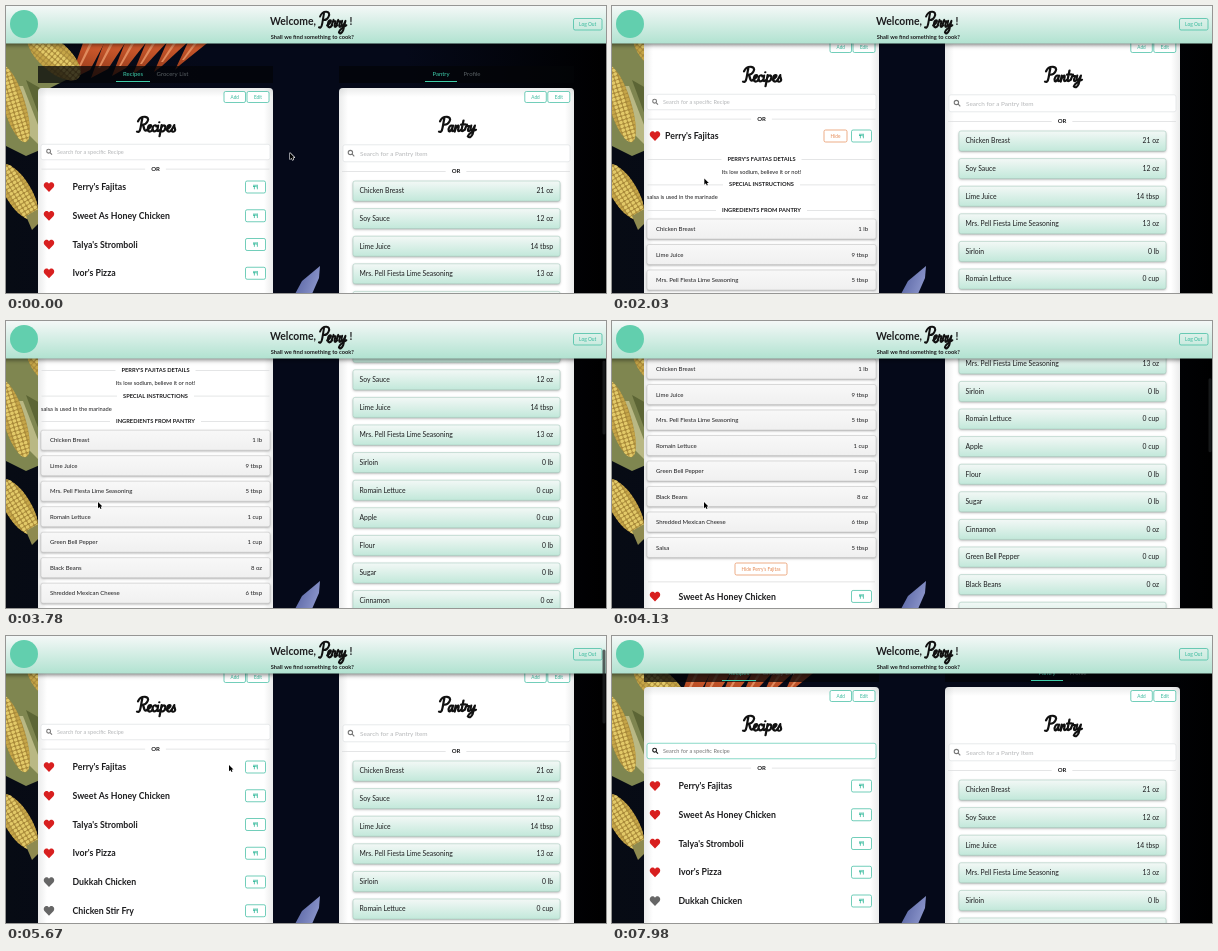
These frames come from a looping animation (600x287 px, 8 s). An HTML page with a canvas:

```html
<!DOCTYPE html>
<html lang="en">
<head>
<meta charset="utf-8">
<title>Pantry</title>
<style>
  html, body { margin: 0; width: 100%; height: 100%; overflow: hidden; background: #04070f; }
  canvas { display: block; width: 600px; height: 287px; }
</style>
</head>
<body>
<canvas id="stage"></canvas>
<script>
const W = 600, H = 287, LOOP = 8000, TICK = 70;
const canvas = document.getElementById('stage');
const g = canvas.getContext('2d');
const dpr = window.devicePixelRatio || 1;
canvas.width = W * dpr;
canvas.height = H * dpr;

const MINT = '#35b99c', ORANGE = '#e58a55', INK = '#1d1d1f';
const OPEN_AT = 1470, CLOSE_AT = 5600, FOCUS_AT = 6370, POINTER_OFF = 7140;

const scrollKeys = [[70, 0], [770, 65.5], [910, 65.5], [1260, 50], [3420, 50], [4060, 225],
  [4390, 225], [5110, 50], [5880, 50], [6230, 31]];
const pointerKeys = [[70, 284, 147], [800, 167, 154], [910, 167, 154], [1300, 94, 129],
  [1540, 94, 129], [2200, 92, 181], [5110, 92, 181], [5460, 223, 129], [5700, 223, 129], [6230, 181, 111]];

const recipes = ["Perry's Fajitas", 'Sweet As Honey Chicken', "Talya's Stromboli", "Ivor's Pizza",
  'Dukkah Chicken', 'Chicken Stir Fry'];
const SEASONING = 'Mrs. Pell Fiesta Lime Seasoning';
const pantry = [['Chicken Breast', '21 oz'], ['Soy Sauce', '12 oz'], ['Lime Juice', '14 tbsp'],
  [SEASONING, '13 oz'], ['Sirloin', '0 lb'], ['Romain Lettuce', '0 cup'], ['Apple', '0 cup'],
  ['Flour', '0 lb'], ['Sugar', '0 lb'], ['Cinnamon', '0 oz'], ['Green Bell Pepper', '0 cup'],
  ['Black Beans', '0 oz'], ['Shredded Mexican Cheese', '0 tbsp'], ['Salsa', '0 tbsp']];
const ingredients = [['Chicken Breast', '1 lb'], ['Lime Juice', '9 tbsp'], [SEASONING, '5 tbsp'],
  ['Romain Lettuce', '1 cup'], ['Green Bell Pepper', '1 cup'], ['Black Beans', '8 oz'],
  ['Shredded Mexican Cheese', '6 tbsp'], ['Salsa', '5 tbsp']];

// Brush-script letters: [advance, pen path], baseline at y = 0
const tail = 'q.4,3 3,0';
const bowl = 'M4,-14C3,-6 4,2 0,0M0,-11C2,-18 12,-17 9.5,-11Q8,-7 4,-7.5';
const script = {
  P: [8.8, bowl],
  R: [9.8, bowl + 'C7,-8 6,1 10,-1.5'],
  e: [5, 'M0,-2C3,-3 5,-7 3,-7C0,-7 0,0 3,0Q4.5,0 5.5,-2'],
  c: [4.7, 'M4,-5.5C4,-8 0,-7 .5,-3C1,1 4,0 5,-2'],
  i: [3.5, 'M1,-6.5L.8,-2' + tail + 'M1.8,-10l.1,0'],
  p: [6.1, 'M1,-7L0,5M.8,-4C3,-9 6,-6 4.5,-2Q3,1 .8,-1'],
  s: [4.5, 'M0,-1L2.5,-7C2,-4 5,-3 3.5,-.5Q2,1 .5,-.8'],
  a: [6.4, 'M4.5,-5.5C2,-9 -.5,-3 1,-.5C2.5,1 4,-3 4.6,-6.5L4,-2' + tail],
  n: [6.2, 'M.8,-6.5L.5,0C1,-5 4,-9 4,-5L3.7,-2' + tail],
  t: [4.2, 'M2,-12L1,-2' + tail + 'M0,-7.5L4,-7.8'],
  r: [5.2, 'M0,-2L1.5,-7.5Q2,-5.5 4,-6L3.2,-2' + tail],
  y: [6, 'M.8,-6.5C0,-1 2,1 4.5,-6.5L3,3Q1,8 -1.5,5Q0,1 6,-2']
};

function at(keys, t) {
  if (t <= keys[0][0]) return keys[0].slice(1);
  for (let i = 1; i < keys.length; i++) {
    const a = keys[i - 1], b = keys[i];
    if (t < b[0]) {
      const u = (t - a[0]) / (b[0] - a[0]), e = u * u * (3 - 2 * u);
      return a.slice(1).map((v, k) => v + (b[k + 1] - v) * e);
    }
  }
  return keys[keys.length - 1].slice(1);
}

function text(str, x, y, size, color = INK, align = 'left', weight = 400) {
  g.font = `${weight} ${size}px Lato, sans-serif`;
  g.textAlign = align;
  g.fillStyle = color;
  g.fillText(str, x, y + size * 0.35);
}

function scriptText(str, x, y, sx, sy) {
  g.save();
  g.translate(x, y);
  g.transform(sx, 0, -0.1 * sy, sy, 0, 0);
  g.lineWidth = 2.25;
  g.lineCap = g.lineJoin = 'round';
  g.strokeStyle = '#111';
  for (const ch of str) {
    const [advance, path] = script[ch];
    g.stroke(new Path2D(path));
    g.translate(advance, 0);
  }
  g.restore();
}

function box(x, y, w, h, r, fill, stroke, line = 0.7) {
  g.beginPath();
  g.roundRect(x, y, w, h, r);
  if (fill) { g.fillStyle = fill; g.fill(); }
  if (stroke) { g.strokeStyle = stroke; g.lineWidth = line; g.stroke(); }
}

function shadow(color, blur, dy) {
  g.shadowColor = color;
  g.shadowBlur = blur * dpr;
  g.shadowOffsetY = dy * dpr;
}

function fade(x0, y0, x1, y1, ...colors) {
  const f = g.createLinearGradient(x0, y0, x1, y1);
  colors.forEach((c, i) => f.addColorStop(i / (colors.length - 1), c));
  return f;
}

function ellipse(x, y, rx, ry, angle, fill) {
  g.beginPath();
  g.ellipse(x, y, rx, ry, angle, 0, Math.PI * 2);
  g.fillStyle = fill;
  g.fill();
}

function poly(fill, ...pts) {
  g.beginPath();
  for (let i = 0; i < pts.length; i += 2) g.lineTo(pts[i], pts[i + 1]);
  g.closePath();
  g.fillStyle = fill;
  g.fill();
}

function cob(x, y, rx, ry, angle) {
  g.save();
  g.translate(x, y);
  g.rotate(angle);
  ellipse(0, 0, rx, ry, 0, '#a98a3a');
  g.clip();
  for (let r = -ry; r < ry; r += 4)
    for (let c = -rx; c < rx; c += 4.4)
      ellipse(c + 2, r + 2, 1.9, 1.7, 0, Math.abs(c + 2) < rx * 0.55 ? '#e2c968' : '#c5a548');
  g.restore();
}

function carrots() {
  for (let i = 0; i < 6; i++) {
    const x = 78 + i * 21;
    poly(fade(x, 36, x - 12, 72, '#cf5a2c', '#8c3518'), x, 34, x + 22, 34, x + 6 - i * 3, 64 - i, x - 14, 74 - i * 2);
    poly('#e08a5c', x + 6, 36, x + 9, 36, x - 5, 64 - i * 2, x - 7, 64 - i * 2);
  }
}

function backdrop() {
  g.fillStyle = fade(0, 0, W, 0, '#070b14', '#050919', '#050919', '#000');
  g.fillRect(0, 0, W, H);
  carrots();
  poly('#7f8650', 0, 36, 40, 36, 60, 74, 36, 86, 34, 144, 20, 150, 0, 140);
  poly('#b9b884', 12, 80, 17, 80, 34, 124, 34, 140, 24, 130);
  poly('#5c6535', 20, 74, 34, 82, 34, 112);
  cob(48, 50, 15, 33, -0.85);
  cob(8, 98, 11, 40, -0.3);
  cob(12, 186, 13, 32, -0.55);
  poly('#8e8a50', 20, 210, 34, 202, 34, 216, 26, 224);
  poly(fade(290, 270, 314, 278, '#5a66a4', '#8d97cc'), 289, 288, 296, 275, 314, 260, 313, 272, 306, 288);
}

function card(x, y, h) {
  const w = 235;
  g.save();
  box(x, y, w, h, 4, '#fff');
  g.clip();
  const edge = 'rgba(120,125,125,.15)', none = 'rgba(120,125,125,0)';
  const sides = [[x, y, x + 9, y], [x + w, y, x + w - 9, y], [x, y, x, y + 9], [x, y + h, x, y + h - 9]];
  for (const s of sides) {
    g.fillStyle = fade(...s, edge, none);
    g.fillRect(x, y, w, h);
  }
  g.restore();
}

function button(label, x, y, w, h, color = MINT) {
  box(x, y - h / 2, w, h, 1.6, '#fff', color);
  if (label) text(label, x + w / 2, y, 4.7, color, 'center');
}

function tabs(x, names, centers, line) {
  g.fillStyle = 'rgba(3,5,8,.72)';
  g.fillRect(x, 60, 235, 17);
  names.forEach((n, i) => text(n, centers[i], 68, 6, i ? '#596064' : '#3ecdab', 'center'));
  g.fillStyle = '#3ecdab';
  g.fillRect(line[0], 75, line[1], 1);
}

function divider(label, x, y, size = 5.7) {
  text(label, x, y, size, INK, 'center', 700);
  const gap = g.measureText(label).width / 2 + 6;
  g.fillStyle = '#dedfe0';
  g.fillRect(x - 114, y, 114 - gap, 0.8);
  g.fillRect(x + gap, y, 114 - gap, 0.8);
}

function search(x, y, w, h, label, textX, size, focused) {
  box(x, y - h / 2, w, h, 2, '#fff', focused ? '#58c9b0' : '#dfe1e2');
  const k = size / 5.6;
  g.strokeStyle = focused ? '#111' : '#777';
  g.lineWidth = 1.1;
  g.beginPath();
  g.arc(textX - 8.4 * k, y - 0.8, 1.9 * k, 0, 7);
  g.moveTo(textX - 7 * k, y + 0.6 * k);
  g.lineTo(textX - 5 * k, y + 2.6 * k);
  g.stroke();
  text(label, textX, y, size, focused ? '#777' : '#b5b7b9');
}

function heart(x, y, color) {
  g.fillStyle = color;
  g.fill(new Path2D(`M${x},${y + 5}l-4.6,-4.8c-2.2,-3.3 2,-7 4.6,-3.5c2.6,-3.5 6.8,.2 4.6,3.5z`));
}

function cookButton(y) {
  button('', 239.5, y, 20, 12);
  g.fillStyle = MINT;
  for (const x of [247.3, 248.3, 249.3]) g.fillRect(x - 0.3, y - 2.3, 0.6, 1.7);
  g.fillRect(247, y - 0.9, 2.6, 0.9);
  g.fillRect(247.9, y - 0.8, 0.8, 3.1);
  g.fillRect(250.4, y - 2.3, 1.3, 2.6);
  g.fillRect(250.9, y, 0.8, 2.3);
}

function recipeRow(i, y, x = 66.5) {
  heart(43, y, i < 4 ? '#d81f1f' : '#666');
  text(recipes[i], x, y, 8.75, INK, 'left', 700);
  cookButton(y);
}

function item([name, amount], y, x, w, pad, size, top, bottom, border) {
  g.save();
  shadow('rgba(0,0,0,.35)', 2.5, 1);
  box(x, y - 10, w, 20, 2, fade(0, y - 10, 0, y + 10, top, bottom));
  g.restore();
  box(x, y - 10, w, 20, 2, null, border, 0.6);
  text(name, x + pad, y, size);
  text(amount, x + w - (pad > 7 ? 8 : 7), y, size, INK, 'right');
}

function details() {
  recipeRow(0, 180, 53);
  button('Hide', 212, 180, 23, 12, ORANGE);
  divider("PERRY'S FAJITAS DETAILS", 149.5, 203);
  text('Its low sodium, believe it or not!', 149.5, 216, 5.7, INK, 'center');
  divider('SPECIAL INSTRUCTIONS', 149.5, 228.5);
  text('salsa is used in the marinade', 35, 241.5, 5.7);
  divider('INGREDIENTS FROM PANTRY', 149.5, 254);
  ingredients.forEach((n, i) =>
    item(n, 273 + i * 25.5, 35, 229, 9, 6, '#f8f8f8', '#f0f0f0', '#c8c8c8'));
  button("Hide Perry's Fajitas", 123, 473, 52, 12, ORANGE);
  g.fillStyle = '#dcdcdc';
  g.fillRect(36, 485.5, 227, 0.8);
}

function page(t) {
  const open = t >= OPEN_AT && t < CLOSE_AT, focused = t >= FOCUS_AT;
  tabs(32, ['Recipes', 'Grocery List'], [127, 166.5], [110, 34]);
  tabs(333, ['Pantry', 'Profile'], [435, 466], [419, 32]);

  card(32, 82, open ? 556 : 265);
  card(333, 82, 800);
  for (const x of [218, 518.8]) {
    button('Add', x, 91, 21.5, 11);
    button('Edit', x + 23, 91, 22, 11);
  }
  scriptText('Recipes', 131, 125.6, 1, 0.93);
  scriptText('Pantry', 433, 125.6, 1, 0.93);

  search(35, 146, 229, 15.5, 'Search for a specific Recipe', 51, 5.6, focused);
  if (focused && (t - FOCUS_AT) % 1000 < 500) {
    g.fillStyle = '#222';
    g.fillRect(50.6, 143, 0.7, 6.4);
  }
  search(337, 147.3, 227, 17, 'Search for a Pantry Item', 354, 6.4, false);
  divider('OR', 149.5, 162.7, 6);
  divider('OR', 450, 165, 6);

  if (open) details();
  else recipeRow(0, 181);
  for (let i = 1; i < recipes.length; i++) recipeRow(i, (open ? 471.7 : 181) + i * 28.75);
  pantry.forEach((n, i) =>
    item(n, 185 + i * 27.6, 347, 207, 6.5, 6.8, '#f3f8f6', '#c2e8da', '#a9cfc1'));
}

function header() {
  g.save();
  shadow('rgba(0,0,0,.6)', 5, 1.5);
  g.fillStyle = fade(0, 0, 0, 38, '#f4f8f7', '#b0e2d0');
  g.fillRect(-10, -10, W + 20, 47.5);
  g.restore();
  ellipse(18, 18, 14, 14, 0, '#62cfae');
  text('Welcome,', 264, 15.3, 10.4, INK, 'left', 700);
  scriptText('Perry', 313, 21.3, 0.9, 0.98);
  text('!', 343.4, 15.3, 10.4, INK, 'left', 700);
  text('Shall we find something to cook?', 306.3, 30.7, 5.7, INK, 'center', 700);
  box(567.5, 12.5, 28.5, 11.5, 1.6, null, MINT);
  text('Log Out', 581.7, 18.2, 4.9, MINT, 'center');
}

function scrollbar(t, s) {
  const shown = (t >= 70 && t < 1330) || (t >= 3430 && t < 6440);
  if (shown) box(596.5, 1 + s * 0.25, 3, 74, 1.5, 'rgba(32,34,36,.7)');
}

function pointer(t) {
  if (t >= POINTER_OFF) return;
  const [x, y] = at(pointerKeys, t);
  g.save();
  g.translate(x, y);
  g.lineJoin = 'round';
  if (t >= 6160) {
    g.strokeStyle = '#222';
    g.lineWidth = 0.8;
    g.stroke(new Path2D('M-1.6,-3.4Q0,-3.4 0,-2.4V2.4Q0,3.4 -1.6,3.4M1.6,-3.4Q0,-3.4 0,-2.4M0,2.4Q0,3.4 1.6,3.4'));
  } else {
    const arrow = new Path2D('M0,0V6.2L1.5,4.9L2.5,7L3.5,6.5L2.6,4.5H4.5Z');
    g.strokeStyle = '#fff';
    g.lineWidth = 1.1;
    g.stroke(arrow);
    g.fillStyle = '#000';
    g.fill(arrow);
  }
  g.restore();
}

function draw(t) {
  const [s] = at(scrollKeys, t);
  g.setTransform(dpr, 0, 0, dpr, 0, 0);
  backdrop();
  g.save();
  g.translate(0, -s);
  page(t);
  g.restore();
  header();
  scrollbar(t, s);
  pointer(t);
}

const start = performance.now();
function loop() {
  const t = (performance.now() - start) % LOOP;
  draw(Math.floor(t / TICK) * TICK);
  requestAnimationFrame(loop);
}
loop();
</script>
</body>
</html>
```
